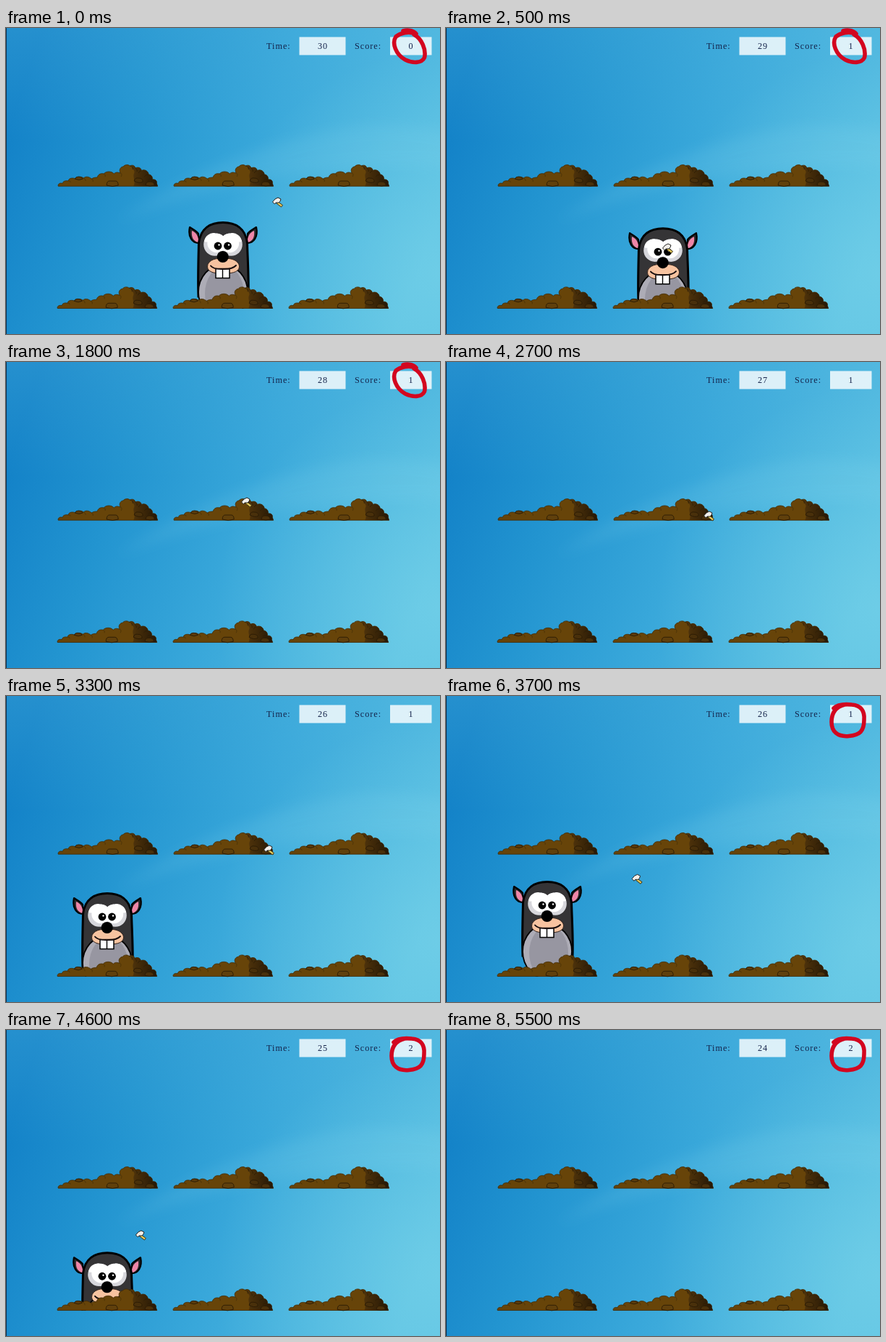
An HTML page that plays this animation: 600 px wide and 424 px high, repeating every 5600 ms.

```html
<!DOCTYPE html>
<html lang="en">
<head>
<meta charset="utf-8">
<title>Mole game</title>
<style>
  html, body { margin: 0; width: 100%; height: 100%; overflow: hidden; background: #3aa6d9; }
  svg { display: block; width: 600px; height: 424px; }
  text { font: 12.2px "Liberation Serif", "Times New Roman", serif; letter-spacing: 1px; fill: #14224a; }
  .value { text-anchor: middle; }
  .ring { fill: none; stroke: #d3061f; stroke-width: 5.6; stroke-linecap: round; stroke-linejoin: round; }
</style>
</head>
<body>
<svg viewBox="0 0 600 424">
  <defs>
    <linearGradient id="sky" x1="0" y1=".35" x2="1" y2=".6">
      <stop offset="0" stop-color="#1382c8"/>
      <stop offset=".25" stop-color="#2294d0"/>
      <stop offset=".55" stop-color="#38a7da"/>
      <stop offset="1" stop-color="#5ac0e2"/>
    </linearGradient>
    <radialGradient id="glow" gradientUnits="userSpaceOnUse" cx="600" cy="340" r="310">
      <stop offset="0" stop-color="#82daec" stop-opacity=".48"/>
      <stop offset="1" stop-color="#82daec" stop-opacity="0"/>
    </radialGradient>
    <linearGradient id="topLight" x1="0" y1="0" x2="0" y2="1">
      <stop offset="0" stop-color="#58b8e0" stop-opacity=".26"/>
      <stop offset="1" stop-color="#58b8e0" stop-opacity="0"/>
    </linearGradient>
    <linearGradient id="shade">
      <stop offset="0" stop-color="#50340b"/>
      <stop offset="1" stop-color="#251705"/>
    </linearGradient>
    <filter id="soft"><feGaussianBlur stdDeviation="9"/></filter>
    <clipPath id="ground"><rect y="60" width="600" height="329"/></clipPath>

    <!-- Heap: 139 wide, 32 high, base at y 32 -->
    <g id="heap" stroke-linejoin="round">
      <path d="M1 31.2C0 28 4 26 7 27.5C7 24 12 23 15 24C15 20 21 19 25 21C28 17 34 18 36 20
        C39 17 44 18 47 21C50 19 53 19 55 19C56 14 61 13 64 14C67 10 75 10 78 14C81 11 84 12 87 13
        C84 8 88 4 91 4C93 1 98 1 100 3C104 1 107 3 107.5 6C112 4 116 6 116 9.5C121 7 126 11 126 15
        C130 15 132 19 131 22C136 21 138 25 137 27L138.5 31.2Z" fill="#674409" stroke="#402a07" stroke-width=".8"/>
      <path d="M103 3C106 2 107 3 107.5 6C112 4 116 6 116 9.5C121 7 126 11 126 15C130 15 132 19 131 22
        C136 21 138 25 137 27L138.5 31.2H105C109 25 103 18 106 13C108 9 101 6 103 3Z" fill="url(#shade)"/>
      <g fill="none" stroke="#2d1d06" stroke-width=".8">
        <path d="M100 3Q105 4 104 8M107.5 6Q111 8 110 11M116 9.5Q113 10 112 13M126 15Q122 15 120 18M131 22Q127 20 125 23"/>
        <path d="M15 24Q18 23 18 26M36 20Q39 21 39 24M47 21Q50 22 49 25M64 14Q67 15 66 18M87 13Q90 14 88 18" stroke="#4a3108"/>
      </g>
      <g stroke="#2b1b05" stroke-width=".9">
        <path d="M68 30Q68 24 72 24H80Q84 24 84 30Q76 33 68 30Z" fill="#60400c"/>
        <path d="M24 21Q25 18 29 18Q34 18 35 21Q30 24 24 21Z" fill="#5c3c0a"/>
        <path d="M106 24Q107 19 112 20Q118 20 118 25Q113 28 106 24Z" fill="#49300b"/>
        <path d="M122 30Q122 25 127 25Q134 25 134 30Q128 32 122 30Z" fill="#49300b"/>
      </g>
    </g>

    <!-- Mole: centred on x 0, top of the head at y 0 -->
    <g id="ear">
      <path d="M-46 8C-43 10 -37 13 -34 17L-34 30C-42 30 -49 22 -46 8Z" fill="#29282a" stroke="#000" stroke-width="2.2" stroke-linejoin="round"/>
      <path d="M-43 13C-38 15 -34 19 -33.5 29C-41 28 -44 22 -43 13Z" fill="#ee86a8"/>
    </g>
    <g id="mole">
      <use href="#ear"/><use href="#ear" transform="scale(-1 1)"/>
      <path d="M-34 104C-35 82 -34 50 -33.5 30C-31 9 -17 1.5 0 1.5S31 9 33.5 30C34 50 36 82 35 104Z" fill="#353436" stroke="#000" stroke-width="3"/>
      <ellipse cy="98" rx="34" ry="38" fill="#adacb6" stroke="#000" stroke-width="1.8"/>
      <ellipse cx="2" cy="100" rx="27" ry="38" fill="#9796a1"/>
      <g fill="#d7d7dc"><circle cx="-11" cy="32" r="15.8"/><circle cx="11" cy="32" r="15.8"/></g>
      <g fill="#fff"><circle cx="-8.5" cy="30" r="13.2"/><circle cx="9" cy="30" r="13.2"/><path d="M-11 16.3A13 13 0 0 0 -26 28Q-16 30 -8 24ZM11 16.3A13 13 0 0 1 26 28Q16 30 8 24Z"/></g>
      <circle cx="-7" cy="34" r="5.4"/><circle cx="6.5" cy="34" r="5.4"/>
      <circle cx="-5.5" cy="32.5" r="1.2" fill="#fff"/><circle cx="8" cy="32.5" r="1.2" fill="#fff"/>
      <path d="M0 53C-6 49 -22 53 -21.5 63C-21 71 -9 73 0 71C9 73 22 71 22.5 63C23 53 6 49 0 53Z" fill="#f7c3a0" stroke="#33231c" stroke-width="1"/>
      <path d="M-10 65.5H9V78.5H-10Z" fill="#fff" stroke="#000" stroke-width="1.5"/>
      <path d="M-.5 65.5V78.5" stroke="#000" stroke-width="1.4"/>
      <path d="M-17 61.5Q-13 66.5 0 66Q13 66.5 18 61" fill="none" stroke="#1a1010" stroke-width="2" stroke-linecap="round"/>
      <circle cx="-.3" cy="49" r="8"/>
    </g>

    <g id="hammer" stroke-linejoin="round">
      <path d="M0 -1L7.5 4.5L5.5 7L-1 2Z" fill="#e2c75a" stroke="#3c3216"/>
      <path d="M-6.5 0L-3 -4L1 -6L5 -4L4 -1L2 1L-2 1L-3.5 3Z" fill="#f2efea" stroke="#222"/>
    </g>
  </defs>

  <rect width="600" height="424" fill="url(#sky)"/>
  <rect width="600" height="160" fill="url(#topLight)"/>
  <rect width="600" height="424" fill="url(#glow)"/>
  <path d="M150 270C270 190 370 155 470 138Q540 128 620 145V195C480 180 300 210 150 270Z" fill="#8fdcf0" opacity=".13" filter="url(#soft)"/>
  <rect width="1" height="424" fill="#0a3256"/>

  <g clip-path="url(#ground)"><use id="critter" href="#mole"/></g>
  <g id="heaps"></g>

  <g fill="#fff" fill-opacity=".81">
    <rect x="405.5" y="12.5" width="64" height="25"/>
    <rect x="531" y="12.5" width="57.5" height="25"/>
  </g>
  <text x="360" y="29">Time:</text>
  <text x="482" y="29">Score:</text>
  <text class="value" id="time" x="438" y="29"></text>
  <text class="value" id="score" x="560" y="29"></text>

  <path class="ring" id="ringA" d="M549 4C555 2 563 3 567 8C556 4 545 7 539 12C533 21 539 37 552 44C562 49 575 49 578.5 41C581 30 575 15 564 9"/>
  <path class="ring" id="ringB" d="M536 17C541 12 552 11 561 12C574 13 579 21 578 33C578 49 572 54 557 55.5C541 57 533 49 533 36C533 23 539 15 551 12"/>
  <use id="cursor" href="#hammer"/>
</svg>
<script>
  const LOOP = 5600, HIDDEN = 397;
  const $ = id => document.getElementById(id);

  // Rows of [ms, x, y]
  const hammerPath = [
    [0, 375, 241], [350, 306, 305], [500, 306, 305], [900, 340, 247],
    [1400, 336, 225], [1800, 332, 194], [2200, 345, 200], [2600, 363, 213],
    [3400, 363, 213], [4100, 131, 307], [4500, 131, 307], [5400, 625, 100], [LOOP, 625, 100]
  ];
  const molePath = [
    [0, 300, 268], [100, 300, 256], [450, 300, 256], [800, 300, HIDDEN],
    [801, 140, HIDDEN], [2900, 140, HIDDEN], [3300, 140, 272], [3500, 140, 256],
    [4400, 140, 256], [4950, 140, HIDDEN], [LOOP, 140, HIDDEN]
  ];

  function at(path, t) {
    const i = Math.max(1, path.findIndex(row => row[0] >= t));
    const [t0, x0, y0] = path[i - 1], [t1, x1, y1] = path[i];
    const k = (t - t0) / (t1 - t0);
    return `translate(${x0 + (x1 - x0) * k} ${y0 + (y1 - y0) * k})`;
  }

  const show = (id, on) => $(id).style.display = on ? "" : "none";

  for (const [left, top] of [[71.2, 188], [70.2, 357.3]])
    for (let col = 0; col < 3; col++)
      $("heaps").innerHTML += `<use href="#heap" x="${left + col * 160}" y="${top}"/>`;

  function draw(now) {
    const t = Math.floor((now % LOOP) / 100) * 100;
    $("cursor").setAttribute("transform", at(hammerPath, t));
    $("critter").setAttribute("transform", at(molePath, t));
    $("time").textContent = 30 - Math.floor((t + 900) / 1000);
    $("score").textContent = t < 400 ? 0 : t < 4400 ? 1 : 2;
    show("ringA", t < 2300);
    show("ringB", t >= 3600);
  }

  const start = performance.now();
  function tick() {
    draw(performance.now() - start);
    requestAnimationFrame(tick);
  }
  tick();
</script>
</body>
</html>
```
